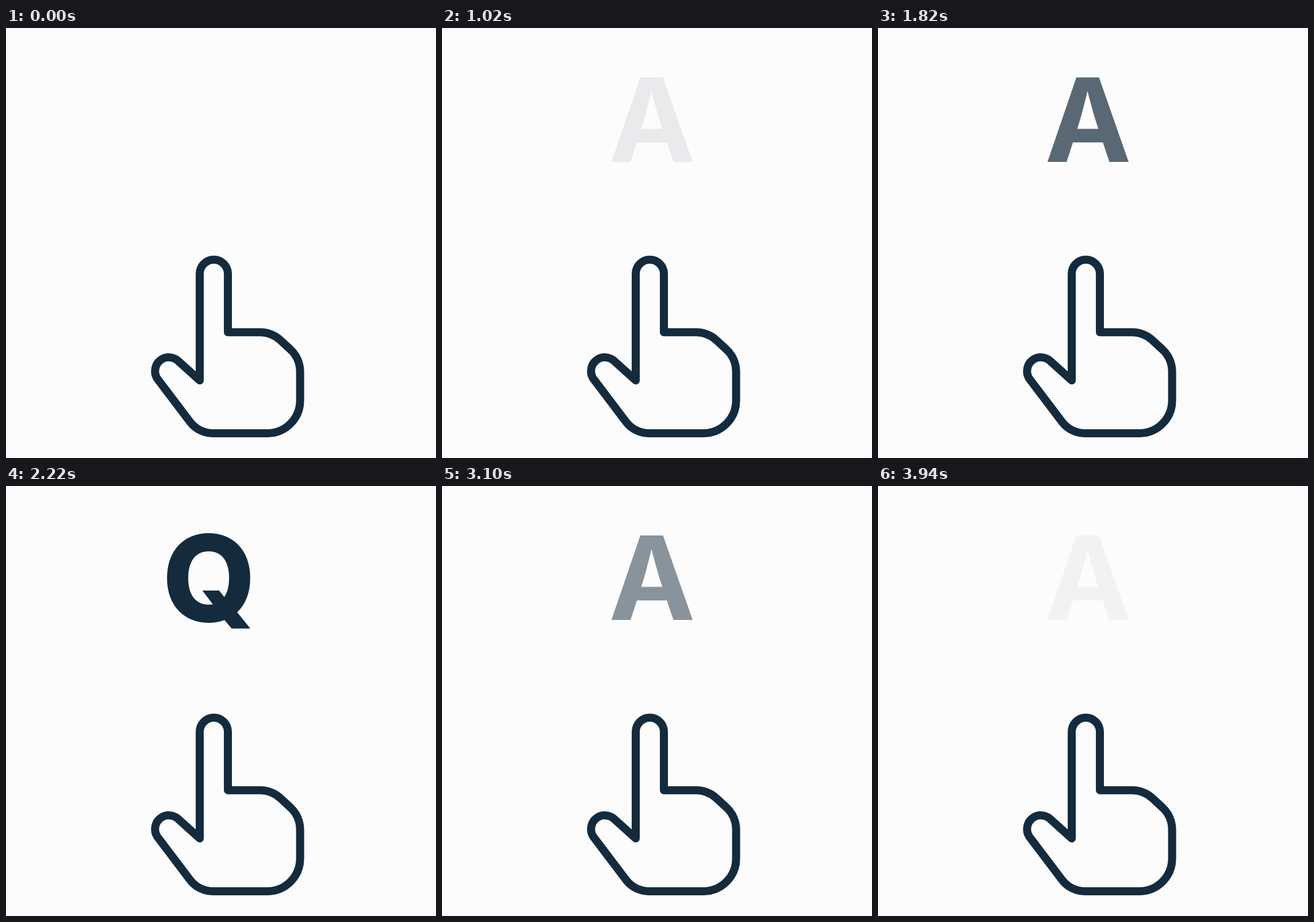
An HTML page that plays this animation: 748x748 px, repeating every 3980 ms.

```html
<!DOCTYPE html>
<html lang="en">
<head>
<meta charset="utf-8">
<title>Pointing hand</title>
<style>
  html, body { margin: 0; height: 100%; overflow: hidden; background: #fcfcfc; }
  svg { display: block; width: 100%; height: 100%; }
  text { font: 800 202px Inter, "Liberation Sans", sans-serif; text-anchor: middle; fill: #142b3d; }
  #A { font-weight: 700; }
  #Q { font-size: 209px; }
  #hand { fill: none; stroke: #142b3d; stroke-width: 14; stroke-linejoin: round; }
</style>
</head>
<body>
<svg viewBox="0 0 748 748">
  <text id="R" x="358" y="233">R</text>
  <text id="A" x="365.5" y="233">A</text>
  <text id="Q" x="353.5" y="235.5">Q</text>
  <path id="hand" d="M337 613V427.5A24.5 24.5 0 0 1 386 427.5V529.3H442.5
    A53 53 0 0 1 476.5 542.4L493.5 558A53 53 0 0 1 511.6 597.5V648A57 57 0 0 1 455 705
    H361A50 50 0 0 1 320.4 685.4L265.5 613A24 24 0 0 1 301.2 580.8Z"/>
</svg>
<script>
  const LOOP = 3980, FADE_IN = 195, FADE_OUT = 182;
  // Start of fade-in and start of fade-out for each appearance
  const shows = {
    R: [[20, 775]],
    A: [[1006, 1767], [3004, 3767]],
    Q: [[2010, 2768]]
  };
  const tapStarts = [1365, 3182];
  // Tap pose: [ms, x, y]
  const tap = [[0, 0, 0], [105, 0, 5], [220, -8, -73], [380, 0, 0]];

  const clamp = v => Math.min(1, Math.max(0, v));
  const smooth = v => v * v * (3 - 2 * v);
  const byId = id => document.getElementById(id);

  const opacity = (t, [start, end]) =>
    Math.min(clamp((t - start) / FADE_IN), clamp(1 - (t - end) / FADE_OUT));

  function tapOffset(t) {
    const next = tap.findIndex(key => key[0] > t);
    if (next < 1) return [0, 0];
    const [t0, x0, y0] = tap[next - 1], [t1, x1, y1] = tap[next];
    const k = smooth((t - t0) / (t1 - t0));
    return [x0 + (x1 - x0) * k, y0 + (y1 - y0) * k];
  }

  function draw(now) {
    const t = now % LOOP;
    for (const id in shows)
      byId(id).style.opacity = Math.max(...shows[id].map(show => opacity(t, show)));
    const start = t < tapStarts[1] ? tapStarts[0] : tapStarts[1];
    byId("hand").setAttribute("transform", `translate(${tapOffset(t - start)})`);
  }

  const begin = performance.now();
  function frame() {
    draw(performance.now() - begin);
    requestAnimationFrame(frame);
  }
  frame();
</script>
</body>
</html>
```
